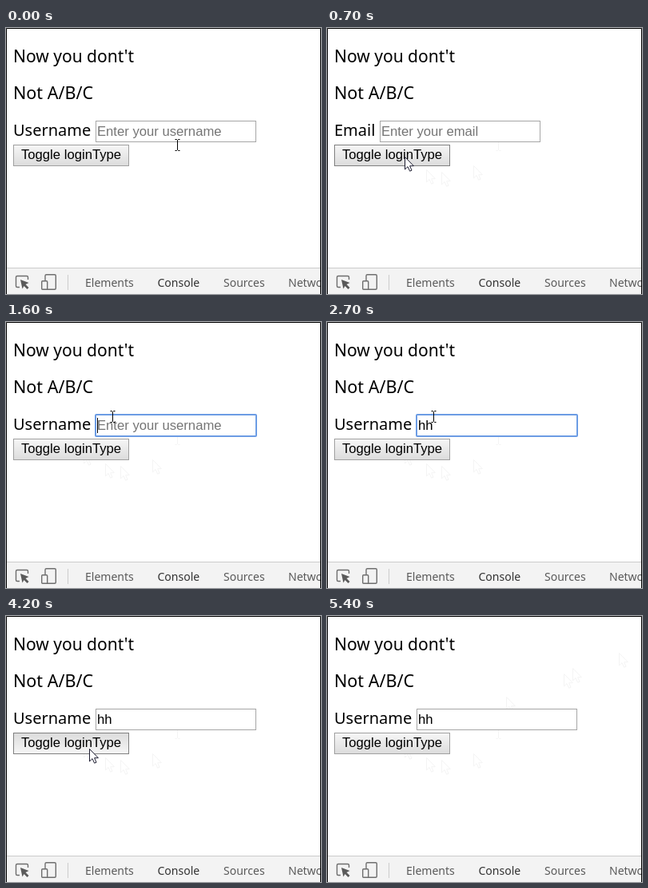
Recreate the animation shown at these times as an HTML page. Size 394 by 333 pixels, loop 6.2 s.

```html
<!DOCTYPE html>
<html lang="en">
<head>
<meta charset="utf-8">
<title>Login type toggle</title>
<style>
  html, body { margin: 0; width: 100%; height: 100%; overflow: hidden; background: #fff; }
  svg { display: block; }
  text { white-space: pre; }
  .page { font: 21px "Noto Sans", sans-serif; }
  .page .label { font-size: 20px; }
  .control { font: 16.67px "Liberation Sans", Arial, sans-serif; }
  .tools { font: 14px "Noto Sans", sans-serif; fill: #5a5a5a; }
  .trail { stroke: #f4f4f4; fill: none; }
</style>
</head>
<body>
<svg width="394" height="333" viewBox="0 0 394 333">
  <defs>
    <linearGradient id="raised" x2="0" y2="1">
      <stop offset="0" stop-color="#f6f6f6"/><stop offset="1" stop-color="#dcdcdc"/>
    </linearGradient>
    <linearGradient id="pressed" x2="0" y2="1">
      <stop offset="0" stop-color="#dcdcdc"/><stop offset="1" stop-color="#f6f6f6"/>
    </linearGradient>
    <path id="arrow" d="M.5 .5V16L4 12.6L6.6 18.2L9 17.2L6.6 11.7H11.4Z"/>
    <path id="beam" d="M.5 .5H2.5L3.5 1.5L4.5 .5H6.5M3.5 1.5V13.5M.5 14.5H2.5L3.5 13.5L4.5 14.5H6.5"/>
  </defs>

  <g id="trails" class="trail"></g>

  <g class="page">
    <text x="9" y="43">Now you dont't</text>
    <text x="9" y="89" font-size="21.5" style="font-size:21.5px">Not A/B/C</text>
    <text id="label" class="label" x="9" y="135"></text>
  </g>

  <g class="control">
    <g id="field">
      <rect id="box" x=".5" y="116.5" width="200" height="26" fill="#fff" stroke="#a6a6a6"/>
      <rect id="ring" x="0" y="116" width="201" height="27" rx="1" fill="none" stroke="#6c9ce4" stroke-width="2"/>
      <text id="value" x="2" y="135"></text>
      <rect id="caret" y="120" width="1" height="19"/>
    </g>
    <rect id="button" x="9.5" y="146.5" width="144" height="26"/>
    <text x="19" y="164">Toggle loginType</text>
  </g>

  <g class="tools">
    <path d="M0 300H394V333H0Z" fill="#f3f3f3"/>
    <path d="M0 300.5H394" stroke="#ccc"/>
    <path d="M77.5 309V328" stroke="#ccc"/>
    <path d="M17 324.5H14Q12.5 324.5 12.5 323V312Q12.5 310.5 14 310.5H26Q27.5 310.5 27.5 312V315"
      fill="none" stroke="#6e6e6e" stroke-width="1.4"/>
    <path d="M18 315L28.5 319L24.5 321L28.5 325L26.5 327L22.5 323L20.5 326.5Z" fill="#5a5a5a"/>
    <g fill="#f3f3f3" stroke="#6e6e6e" stroke-width="1.4">
      <rect x="49" y="308.7" width="13.3" height="18.6" rx="1.5"/>
      <rect x="44.7" y="316.7" width="7" height="10.6" rx="1"/>
    </g>
    <text x="99" y="324">Elements</text>
    <text x="189.5" y="324" fill="#333">Console</text>
    <text x="272" y="324">Sources</text>
    <text x="353" y="324">Network</text>
  </g>

  <path d="M.5 333V.5H393.5V333" fill="none" stroke="#000"/>
  <use id="cursor"/>
</svg>

<script>
const LOOP = 6200;
const PRESS = [600, 1100, 3200, 3600, 4200, 4700];
const PRESS_LENGTH = 100;

// Pointer stops: time, left, top, shape, leaves a faint trail
const STOPS = [
  [0, 211, 139, "beam", true],
  [100, 183, 172, "arrow", true],
  [200, 143, 180, "arrow", true],
  [300, 124, 177, "arrow", true],
  [400, 97, 161, "arrow", true],
  [1300, 106, 150, "arrow"],
  [1400, 122, 127, "beam"],
  [1500, 130, 111, "beam"],
  [2900, 127, 125, "beam"],
  [3000, 112, 156, "arrow"],
  [3100, 104, 166, "arrow"],
  [4900, 224, 101, "arrow", true],
  [5000, 296, 72, "arrow", true],
  [5100, 307, 65, "arrow", true],
  [5200, 365, 46, "arrow", true],
  [5300, 383, 41, "arrow"]
];
const POINTER_GONE = 5400;

const $ = id => document.getElementById(id);
const set = (node, attributes) => {
  for (const name in attributes) node.setAttribute(name, attributes[name]);
};
const show = (node, visible) => set(node, { visibility: visible ? "visible" : "hidden" });
const within = (t, from, to) => t >= from && t < to;

const trails = STOPS.filter(stop => stop[4]).map(([time, x, y, shape]) => {
  const node = document.createElementNS($("trails").namespaceURI, "use");
  set(node, { href: "#" + shape, x, y });
  $("trails").append(node);
  return { node, time };
});

function drawPointer(t) {
  const current = STOPS.findLastIndex(stop => stop[0] <= t);
  const [, x, y, shape] = STOPS[current];
  const isArrow = shape === "arrow";
  set($("cursor"), {
    href: "#" + shape, x, y,
    fill: isArrow ? "#fff" : "none",
    stroke: isArrow ? "#1c1c30" : "#000"
  });
  show($("cursor"), t < POINTER_GONE);
  for (const { node, time } of trails) show(node, time < STOPS[current][0]);
  return isArrow && x < 154 && within(y, 146, 173);
}

function drawForm(t, hovered) {
  const toggles = PRESS.filter(time => t >= time + PRESS_LENGTH).length;
  const kind = toggles % 2 ? "Email" : "Username";
  const typed = "h".repeat((t >= 2100) + (t >= 2200));
  const focused = within(t, 1600, 3200);
  const pressed = PRESS.some(time => within(t, time, time + PRESS_LENGTH));

  $("label").textContent = kind;
  set($("field"), { transform: `translate(${kind === "Email" ? 66 : 112} 0)` });
  $("value").textContent = typed || `Enter your ${kind.toLowerCase()}`;
  set($("value"), { fill: typed ? "#000" : "#757575" });
  show($("ring"), focused);
  show($("caret"), within(t, 1600, 2700));
  set($("caret"), { x: 2 + Math.round(typed.length * 9) });
  set($("button"), {
    fill: `url(#${pressed ? "pressed" : "raised"})`,
    stroke: hovered ? "#808080" : "#a0a0a0"
  });
}

function draw(now) {
  const t = now % LOOP;
  drawForm(t, drawPointer(t));
  requestAnimationFrame(() => draw(performance.now() - start));
}

const start = performance.now();
draw(0);
</script>
</body>
</html>
```
